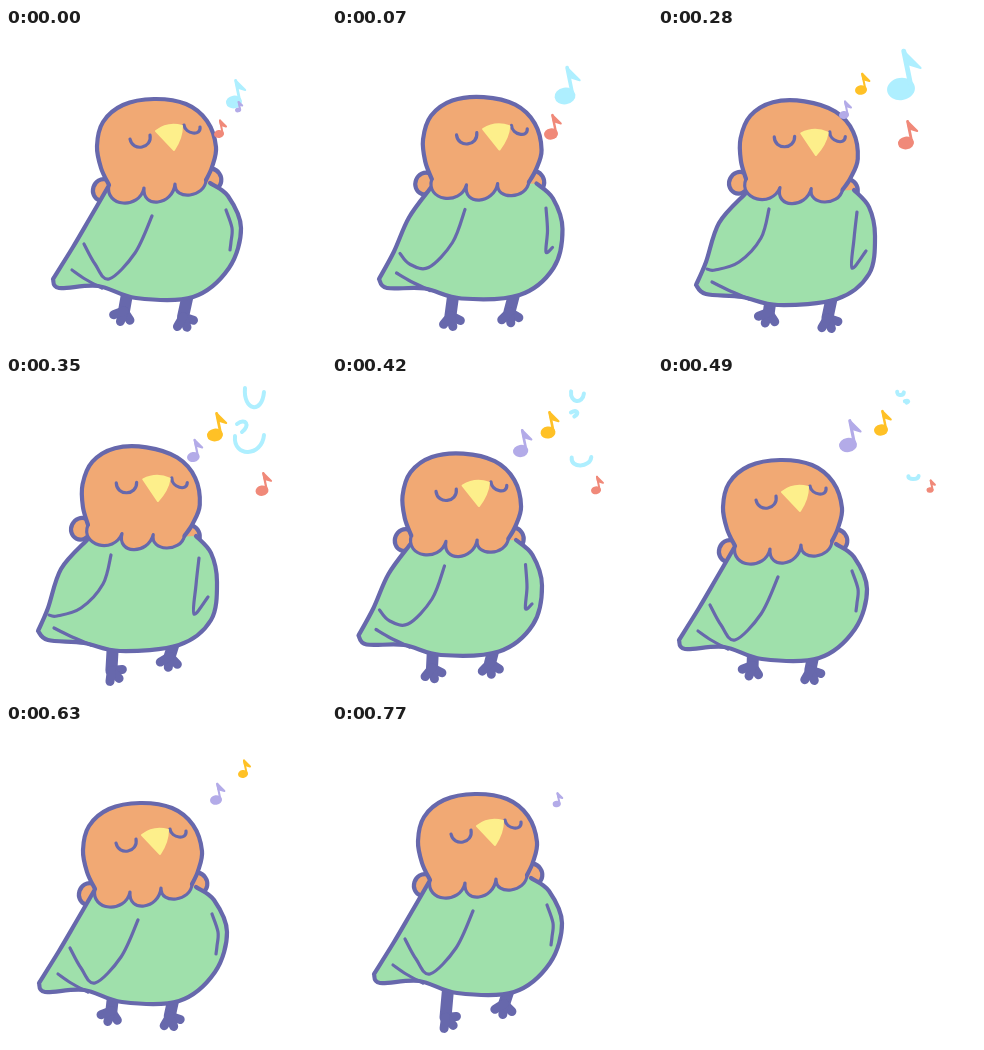
Write an HTML page with a canvas that moves like this. It is 320 px wide and 320 px high and loops after 0.84 s.

```html
<!DOCTYPE html>
<html lang="en">
<head>
<meta charset="utf-8">
<title>Singing bird</title>
<style>
html, body { margin: 0; width: 100%; height: 100%; overflow: hidden; background: #fff; }
canvas { display: block; width: 100vw; height: 100vh; }
</style>
</head>
<body>
<canvas id="stage" width="320" height="320"></canvas>
<script>
const ctx = document.getElementById('stage').getContext('2d');
const STEP = 70, STEPS = 12;
const INK = '#6768ac', ORANGE = '#f1a974', GREEN = '#9fe0ab', YELLOW = '#fdef8b', SKY = '#aeefff';
const OUTLINE = 4.2, DETAIL = 3.2;
const NECK = { x: 155, y: 110, tilt: 0.165 };

// Shapes are runs of x, y pairs. The head is rigid and tilts about NECK.
const head = {
  crown: [103,157, 95,140, 91,118, 97,94, 117,77, 148,71, 180,76, 201,93, 210,119, 206,139, 200,152],
  frill: [200,152, 184,167, 169,156, 152,174, 138,160, 117,175, 103,157],
  leftEye: [124,111, 136,119, 144,107],
  rightEye: [178,97, 187,105, 194,99]
};

// The body blends between these two postures.
const upright = {
  flank: [102,159, 84,190, 67,219, 47,251],
  belly: [47,251, 53,260, 92,258, 130,270, 187,269, 223,240, 235,200, 222,168, 204,155],
  tail: [66,242, 79,251, 96,260],
  wing: [78,216, 89,236, 103,251, 129,225, 146,188],
  side: [220,182, 226,200, 225,214, 224,222]
};
const bowed = {
  flank: [95,163, 69,192, 56,231, 46,254],
  belly: [46,254, 56,263, 92,266, 128,274, 187,268, 219,243, 225,205, 219,176, 204,159],
  tail: [62,251, 78,259, 99,268],
  wing: [57,238, 65,239, 89,231, 111,207, 119,178],
  side: [207,181, 204,208, 202,237, 216,220]
};

// Rows of step, x, y, bow, weight on the left foot.
const sway = [
  [0, 0, 0, 0, 0], [2, 1, -3, 1, 1], [4, -8, 3, 1, 0], [5, -14, 1, 1, 1],
  [7, -26, 13, 0, 0], [9, -14, 8, 0, 0], [11, -5, -1, 0, 1], [12, 0, 0, 0, 0]
];

// Rows of step, x, y, size.
const notes = [
  { color: SKY, path: [[0, 228, 74, 8], [2, 238, 62, 13], [4, 243, 61, 14]] },
  { color: '#f08979', path: [[0, 213, 106, 5], [2, 225, 106, 9], [4, 248, 115, 8], [7, 272, 114, 3.5]] },
  { color: '#ffc126', path: [[4, 203, 62, 6], [5, 209, 59, 8], [7, 223, 54, 7], [9, 237, 50, 5]] },
  { color: '#b3abe8', path: [[4, 186, 87, 5], [7, 190, 69, 9], [9, 210, 76, 6], [12, 232, 82, 3]] }
];

// The blue note bursts into strokes that drift and shrink.
const burst = { start: 5, end: 7, strokes: [
  { pts: [239,12, 247,31, 258,16], dx: -5, dy: -12 },
  { pts: [231,48, 240,47, 236,56], dx: 10, dy: -22 },
  { pts: [229,60, 242,76, 258,59], dx: 13, dy: 27 }
] };

const lerp = (a, b, k) => a.map((v, i) => v + (b[i] - v) * k);

function valueAt(rows, step) {
  const next = rows.findIndex(row => row[0] >= step);
  if (next < 0 || step < rows[0][0]) return null;
  const b = rows[next], a = rows[Math.max(0, next - 1)];
  return lerp(a, b, a === b ? 0 : (step - a[0]) / (b[0] - a[0])).slice(1);
}

// Smooth curve through the points, joined to the current path if asked.
function curve(pts, join) {
  const last = pts.length / 2 - 1;
  const at = i => { const j = 2 * Math.max(0, Math.min(last, i)); return [pts[j], pts[j + 1]]; };
  if (join) ctx.lineTo(...at(0)); else ctx.moveTo(...at(0));
  for (let i = 0; i < last; i++) {
    const [a, b, c, d] = [at(i - 1), at(i), at(i + 1), at(i + 2)];
    ctx.bezierCurveTo(b[0] + (c[0] - a[0]) / 6, b[1] + (c[1] - a[1]) / 6,
      c[0] - (d[0] - b[0]) / 6, c[1] - (d[1] - b[1]) / 6, c[0], c[1]);
  }
}

// U-shaped cups: end, bottom, end, bottom, end ...
function cups(p, join) {
  if (!join) ctx.moveTo(p[0], p[1]);
  for (let i = 0; i + 5 < p.length; i += 4) {
    const [ax, ay, bx, by, cx, cy] = p.slice(i, i + 6);
    const dx = (bx - (ax + cx) / 2) * 4 / 3, dy = (by - (ay + cy) / 2) * 4 / 3;
    ctx.bezierCurveTo(ax + dx, ay + dy, cx + dx, cy + dy, cx, cy);
  }
}

function shape(build, fill, width = 0, ink = INK) {
  ctx.beginPath();
  build();
  if (fill) { ctx.fillStyle = fill; ctx.fill(); }
  if (width) { ctx.lineWidth = width; ctx.strokeStyle = ink; ctx.stroke(); }
}

const line = (pts, width = DETAIL, ink = INK) => shape(() => curve(pts), null, width, ink);
const ellipse = (x, y, rx, ry, tilt = 0) => ctx.ellipse(x, y, rx, ry, tilt, 0, Math.PI * 2);

function inGroup(x, y, tilt, paint) {
  ctx.save();
  ctx.translate(NECK.x + x, NECK.y + y);
  ctx.rotate(tilt);
  ctx.translate(-NECK.x, -NECK.y);
  paint();
  ctx.restore();
}

function drawLeg(hipX, hipY, x, y, angle) {
  line([hipX, hipY, x, y], 12);
  for (const spread of [-0.9, 0, 0.9])
    line([x, y, x + 11 * Math.cos(angle + spread), y + 11 * Math.sin(angle + spread)], 9);
}

function drawPuffs() {
  shape(() => ellipse(97, 162, 10, 11, 0.3), ORANGE, OUTLINE);
  shape(() => ellipse(205, 151, 10, 11, -0.6), ORANGE, OUTLINE);
}

function drawBody(bow) {
  const part = name => lerp(upright[name], bowed[name], bow);
  shape(() => { curve(part('flank')); curve(part('belly'), true); }, GREEN, OUTLINE);
  for (const name of ['tail', 'wing', 'side']) line(part(name));
}

function drawHead() {
  shape(() => { curve(head.crown); cups(head.frill, true); }, ORANGE);
  shape(() => curve(head.crown), null, OUTLINE);
  shape(() => cups(head.frill), null, DETAIL);
  shape(() => cups(head.leftEye), null, DETAIL);
  shape(() => cups(head.rightEye), null, DETAIL);
  shape(() => {
    ctx.moveTo(150, 103);
    ctx.quadraticCurveTo(162, 94, 176, 98);
    ctx.quadraticCurveTo(176, 110, 168, 122);
    ctx.closePath();
  }, YELLOW, 2, YELLOW);
}

function drawBird(step) {
  const [x, y, bow, weight] = valueAt(sway, step);
  const tilt = NECK.tilt * bow;
  const hipY = 266 + 0.8 * y;
  drawLeg(121 + x, hipY, 118 + 0.9 * x, 283 + 0.5 * y + 11 * weight, 1.9 - 1.1 * weight);
  drawLeg(182 + x, hipY, 177 + 0.95 * x, 289 + 0.4 * y - 9 * weight, 1.2 + 0.5 * weight);
  inGroup(x, y, tilt, drawPuffs);
  inGroup(x, y, 0, () => drawBody(bow));
  inGroup(x, y, tilt, drawHead);
}

function drawNote([x, y, size], color) {
  const baseX = x + 0.75 * size, topX = x + 0.2 * size, topY = y - 2.7 * size;
  shape(() => ellipse(x, y, size, 0.8 * size, -0.15), color);
  line([baseX, y, topX, topY], Math.max(2, 0.35 * size), color);
  shape(() => {
    ctx.moveTo(topX, topY);
    ctx.lineTo(x + 1.4 * size, y - 1.5 * size);
    ctx.lineTo(x + 0.4 * size, y - 1.8 * size);
    ctx.closePath();
  }, color, 2, color);
}

function drawBurst(step) {
  const age = (step - burst.start) / (burst.end - burst.start);
  if (age < 0 || age > 1) return;
  const size = 1 - 0.65 * age;
  for (const { pts, dx, dy } of burst.strokes) {
    const [, , midX, midY] = pts;
    const moved = pts.map((v, i) => i % 2
      ? midY + (v - midY) * size * (1 - 0.5 * age) + dy * age
      : midX + (v - midX) * size + dx * age);
    shape(() => cups(moved), null, 4, SKY);
  }
}

function draw(step) {
  ctx.fillStyle = '#fff';
  ctx.fillRect(0, 0, 320, 320);
  ctx.lineCap = ctx.lineJoin = 'round';
  drawBird(step);
  for (const { color, path } of notes) {
    const note = valueAt(path, step) || valueAt(path, step + STEPS);
    if (note) drawNote(note, color);
  }
  drawBurst(step);
}

function tick(now) {
  draw(Math.floor(now / STEP) % STEPS);
  requestAnimationFrame(tick);
}
draw(0);
requestAnimationFrame(tick);
</script>
</body>
</html>
```
